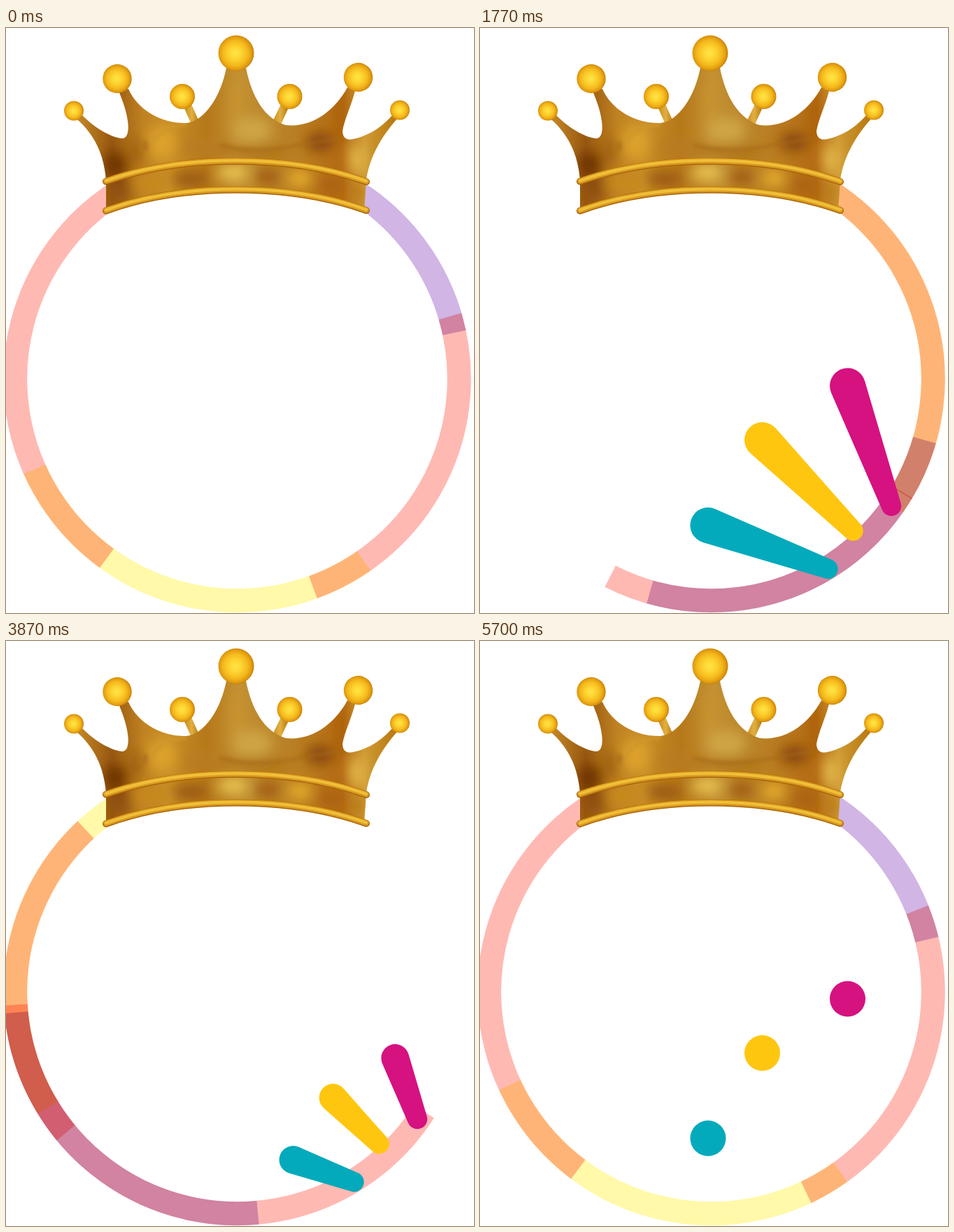
Write an HTML page that moves like this. It is 669 px wide and 837 px high and loops after 5.73 s.

```html
<!DOCTYPE html>
<html lang="en">
<head>
<meta charset="utf-8">
<title>Crowned ring</title>
<style>
  html, body { margin: 0; width: 100%; height: 100%; overflow: hidden; background: #fff; }
  svg { display: block; width: 669px; height: 837px; }
  #ring { isolation: isolate; }
  #ring circle { fill: none; stroke-width: 34; mix-blend-mode: multiply; }
  .rim { fill: none; stroke-linecap: round; }
</style>
</head>
<body>
<svg viewBox="0 0 669 837" xmlns="http://www.w3.org/2000/svg">
  <defs>
    <radialGradient id="ball" cx=".48" cy=".5" r=".53">
      <stop offset="0" stop-color="#ffe548"/>
      <stop offset=".3" stop-color="#fdd633"/>
      <stop offset=".65" stop-color="#f5b91d"/>
      <stop offset=".87" stop-color="#e09a0e"/>
      <stop offset="1" stop-color="#c07606"/>
    </radialGradient>
    <linearGradient id="gold" gradientUnits="userSpaceOnUse" x1="106" y1="0" x2="558" y2="0">
      <stop offset="0" stop-color="#c08424"/>
      <stop offset=".1" stop-color="#985810"/>
      <stop offset=".2" stop-color="#c08222"/>
      <stop offset=".28" stop-color="#c88e28"/>
      <stop offset=".4" stop-color="#b67819"/>
      <stop offset=".5" stop-color="#c29032"/>
      <stop offset=".6" stop-color="#bb862b"/>
      <stop offset=".72" stop-color="#b87a1e"/>
      <stop offset=".83" stop-color="#b46a13"/>
      <stop offset=".9" stop-color="#cf9a34"/>
      <stop offset="1" stop-color="#b8780f"/>
    </linearGradient>
    <linearGradient id="stem" x1="0" y1="0" x2="1" y2="0">
      <stop offset="0" stop-color="#c98a1c"/>
      <stop offset=".5" stop-color="#e0b040"/>
      <stop offset="1" stop-color="#b87512"/>
    </linearGradient>
    <filter id="soft" x="-60%" y="-60%" width="220%" height="220%"><feGaussianBlur stdDeviation="9"/></filter>
    <filter id="fine" x="-60%" y="-60%" width="220%" height="220%"><feGaussianBlur stdDeviation="2.5"/></filter>
    <path id="body" d="M108 124C126 142 148 156 166 158C174 158 176 147 174 133C172 118 167 105 161 90L175 87C188 117 222 137 258 136C284 133 307 98 315 57L343 57C351 97 369 130 400 139C438 143 470 118 488 85L499 90C494 110 484 130 481 147C481 158 488 161 496 159C519 154 537 142 552 125L559 130C537 155 520 184 515 217L512 262Q432 233 329 233Q225 233 143 263L143 217C140 180 126 152 101 130Z"/>
    <clipPath id="inside"><use href="#body"/></clipPath>
    <path id="rim1" d="M143 219.5Q225 190.5 329 190.5T515 220"/>
    <path id="rim2" d="M143 261.5Q225 231.5 329 231.5T515 261"/>
  </defs>

  <g id="ring"><rect width="669" height="837" fill="#fff"/></g>
  <g id="bars"></g>

  <g id="crown">
    <path fill="url(#stem)" d="M254 113L265 109L277 136L266 140Z"/>
    <path fill="url(#stem)" d="M393 109L404 114L392 140L380 136Z"/>
    <use href="#body" fill="url(#gold)"/>
    <g clip-path="url(#inside)">
      <g filter="url(#soft)">
        <ellipse cx="156" cy="196" rx="17" ry="20" fill="#703604"/>
        <ellipse cx="186" cy="176" rx="12" ry="20" fill="#a2630f"/>
        <ellipse cx="222" cy="164" rx="20" ry="24" fill="#dda12c"/>
        <ellipse cx="285" cy="172" rx="34" ry="12" fill="#ba7c20"/>
        <ellipse cx="329" cy="105" rx="8" ry="36" fill="#c9942f"/>
        <ellipse cx="352" cy="146" rx="28" ry="18" fill="#cfa544"/>
        <ellipse cx="355" cy="178" rx="50" ry="6" fill="#a9680f"/>
        <ellipse cx="449" cy="163" rx="20" ry="13" fill="#874509"/>
        <ellipse cx="478" cy="130" rx="6" ry="36" fill="#a95d0d"/>
        <ellipse cx="502" cy="188" rx="11" ry="22" fill="#e2b84c"/>
        <ellipse cx="205" cy="222" rx="26" ry="12" fill="#c8891f"/>
        <ellipse cx="163" cy="230" rx="14" ry="18" fill="#8d4d0b"/>
        <ellipse cx="264" cy="216" rx="26" ry="11" fill="#9a570d"/>
        <ellipse cx="324" cy="207" rx="22" ry="10" fill="#ecc855"/>
        <ellipse cx="374" cy="213" rx="18" ry="12" fill="#a25b0c"/>
        <ellipse cx="420" cy="215" rx="17" ry="13" fill="#e4aa2c"/>
        <ellipse cx="464" cy="226" rx="18" ry="13" fill="#aa620c"/>
        <ellipse cx="503" cy="236" rx="9" ry="15" fill="#b87919"/>
      </g>
      <g filter="url(#fine)">
        <path fill="#b3721a" d="M188 174L199 160L206 170L200 176Z"/>
        <path fill="none" stroke="#cf962c" stroke-width="5" d="M205 172C214 150 232 139 258 138"/>
        <path fill="none" stroke="#a66915" stroke-width="3" d="M305 167Q350 180 405 170T480 158"/>
      </g>
    </g>
    <g id="rims"></g>
    <g id="balls" fill="url(#ball)"></g>
  </g>
</svg>

<script>
const LOOP = 5730, STEPS = 36, BURST = 15;
const NS = 'http://www.w3.org/2000/svg';
const byId = id => document.getElementById(id);
const clamp = v => Math.max(0, Math.min(1, v));

function add(parent, tag, attrs) {
  const el = document.createElementNS(NS, tag);
  for (const k in attrs) el.setAttribute(k, attrs[k]);
  return byId(parent).appendChild(el);
}

// Cubic easing with flat ends; out is the x of the second handle.
function ease(x, out) {
  let lo = 0, hi = 1;
  for (let i = 0; i < 30; i++) {
    const m = (lo + hi) / 2, n = 1 - m;
    if (n * n * m + 3 * n * m * m * out + m * m * m < x) lo = m; else hi = m;
  }
  return lo * lo * (3 - 2 * lo);
}

// start and span in degrees clockwise from the top, turn per cycle
const arcs = [
  { color: '#ffb9b3', start: 216, span: 144, turn: -360, out: 2 / 3 },
  { color: '#fff9a9', start: 145.2, span: 100.8, turn: 360, out: 2 / 3 },
  { color: '#ffb9b3', start: 73.6, span: 86.4, turn: 720, out: 5 / 6 },
  { color: '#d1b5e5', start: -12, span: 90, turn: 720, out: 2 / 3 }
];
for (const a of arcs) {
  a.el = add('ring', 'circle', {
    cx: 330.5, cy: 502, r: 317.25, stroke: a.color,
    pathLength: 360, 'stroke-dasharray': `${a.span} ${360 - a.span}`
  });
}

const WIDE = 25.5, NARROW = 14.2;
const bars = [
  { color: '#d51280', x: 525.5, y: 512, dx: 62.5, dy: 172 },
  { color: '#ffc610', x: 403.5, y: 589.5, dx: 130, dy: 130 },
  { color: '#02aabb', x: 326, y: 711.5, dx: 171.5, dy: 62.5 }
];
for (const b of bars) b.el = add('bars', 'path', { fill: b.color });

for (const [x, y, r] of [[329, 36, 25.5], [159, 72.5, 20.7], [503.5, 70.5, 20.7],
  [252, 98, 18], [405.5, 98, 18], [97, 118.5, 14], [563, 117.5, 14]]) {
  add('balls', 'circle', { cx: x, cy: y, r });
}
for (const id of ['rim1', 'rim2']) {
  for (const [color, width, y] of [['#a8640b', 10, 0], ['#d99a1f', 8, -.5], ['#f0bf38', 4, -1]]) {
    add('rims', 'use', { href: '#' + id, class: 'rim', stroke: color, 'stroke-width': width, y });
  }
}

// Outline around two circles, the first one the larger.
function capsule(x1, y1, r1, x2, y2, r2) {
  const d = Math.hypot(x2 - x1, y2 - y1);
  if (d <= r1 - r2 + .01) {
    return `M${x1 - r1} ${y1}a${r1} ${r1} 0 1 1 ${2 * r1} 0a${r1} ${r1} 0 1 1 ${-2 * r1} 0Z`;
  }
  const a = Math.atan2(y2 - y1, x2 - x1), f = Math.acos((r1 - r2) / d);
  const at = (x, y, r, t) => `${x + r * Math.cos(t)} ${y + r * Math.sin(t)}`;
  return `M${at(x1, y1, r1, a + f)}A${r1} ${r1} 0 1 1 ${at(x1, y1, r1, a - f)}` +
    `L${at(x2, y2, r2, a - f)}A${r2} ${r2} 0 0 1 ${at(x2, y2, r2, a + f)}Z`;
}

function barPath(b, p) {
  const size = p < 1 ? 0 : clamp((13 - p) / 2);
  if (!size) return '';
  const from = clamp((4.97 - p) / 4), to = 1 - clamp((p - 7) / 4);
  const len = Math.hypot(b.dx, b.dy), shift = WIDE * (1 - size) / len;
  const end = u => [b.x + b.dx * (u - shift), b.y + b.dy * (u - shift),
    (WIDE + (NARROW - WIDE) * u) * size];
  return capsule(...end(from), ...end(to));
}

function draw(ms) {
  // 12.5 pictures a second, shown on a 30 Hz clock
  const tick = Math.floor((ms % LOOP + 3.4) * .03);
  const step = Math.floor(tick * 5 / 12) % (2 * STEPS);
  const s = step % STEPS / STEPS;
  for (const a of arcs) {
    const angle = a.start + a.turn * (s && ease(s, a.out)) - 90;
    a.el.setAttribute('transform', `rotate(${angle} 330.5 502)`);
  }
  for (const b of bars) b.el.setAttribute('d', barPath(b, step % BURST));
}

const begin = performance.now();
function loop() {
  draw(performance.now() - begin);
  requestAnimationFrame(loop);
}
loop();
</script>
</body>
</html>
```
